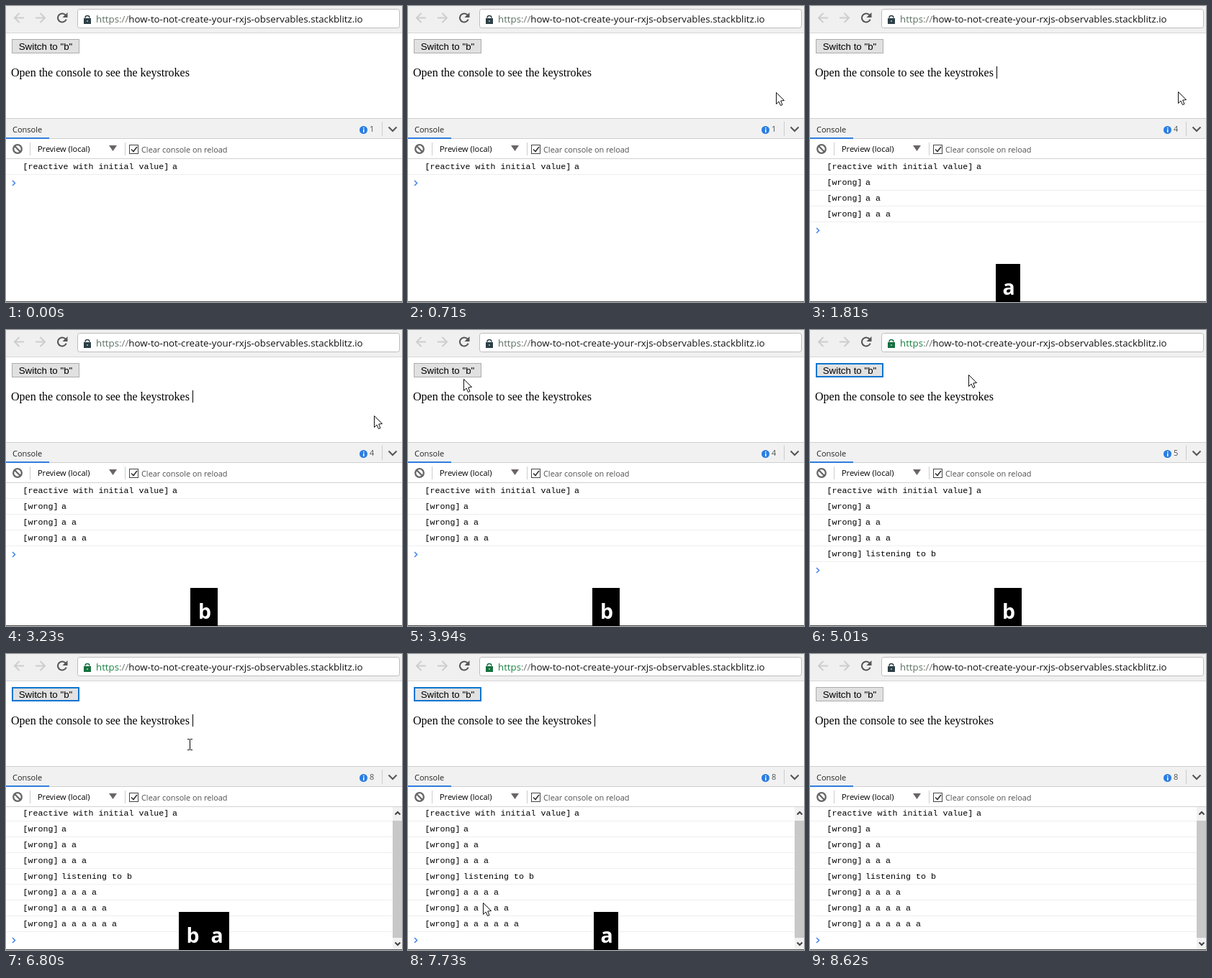
Write an HTML page with a canvas that moves like this. It is 550 px wide and 412 px high and loops after 8640 ms.

```html
<!DOCTYPE html>
<html lang="en">
<head>
<meta charset="utf-8">
<title>Console keystrokes</title>
<style>
  html, body { margin: 0; width: 100%; height: 100%; overflow: hidden; background: #fff; }
  canvas { display: block; width: 550px; height: 412px; }
</style>
</head>
<body>
<canvas id="stage" width="550" height="412"></canvas>
<script>
const ctx = document.getElementById('stage').getContext('2d');
const W = 550, H = 412, LOOP = 8640;
const SANS = '"Open Sans", "Noto Sans", sans-serif';
const MONO = '11.667px "Liberation Mono", "Courier New", monospace';
const UI = '11px ' + SANS;

const LOGS = [
  [0, '[reactive with initial value]', 'a'],
  [1070, '[wrong]', 'a'],
  [1450, '[wrong]', 'a a'],
  [1760, '[wrong]', 'a a a'],
  [4180, '[wrong]', 'listening to b'],
  [6300, '[wrong]', 'a a a a'],
  [6600, '[wrong]', 'a a a a a'],
  [6780, '[wrong]', 'a a a a a a']
];
// Times at which the caret toggles, starting hidden.
const CARET = [760, 1290, 1800, 2300, 2820, 3340, 4310, 4830, 5370, 5890, 6400, 7170, 7690, 8210];
const KEYS = [[0, ''], [1070, 'a'], [2530, 'ab'], [2590, 'b'], [6300, 'ba'], [6900, 'a'], [8030, '']];

const linear = u => u;
const smooth = u => u * u * (3 - 2 * u);
const easeOut = u => 1 - (1 - u) * (1 - u);
const easeIn = u => u * u;
// Pointer stops: time, x, y, easing of the way there.
const PATH = [
  [100, 470, 371, linear],
  [760, 511, 119, easeOut],
  [3230, 511, 119, linear],
  [3940, 77, 68, smooth],
  [4080, 78, 65, smooth],
  [4180, 78, 65, linear],
  [4830, 220, 62, smooth],
  [6770, 220, 62, linear],
  [6800, 255, 126, linear],
  [7730, 104, 346, easeOut],
  [8060, 62, 413, easeIn]
];

function rect(x, y, w, h, color) {
  ctx.fillStyle = color;
  ctx.fillRect(x, y, w, h);
}

function text(str, x, y, font, color, align = 'left') {
  ctx.font = font;
  ctx.fillStyle = color;
  ctx.textAlign = align;
  ctx.fillText(str, x, y);
}

function trace(points) {
  ctx.beginPath();
  points.forEach(([x, y], i) => i ? ctx.lineTo(x, y) : ctx.moveTo(x, y));
}

function line(points, color, width = 1) {
  trace(points);
  ctx.strokeStyle = color;
  ctx.lineWidth = width;
  ctx.stroke();
}

function shape(points, color) {
  trace(points);
  ctx.closePath();
  ctx.fillStyle = color;
  ctx.fill();
}

function arc(x, y, r, from, to, color, width) {
  ctx.beginPath();
  ctx.arc(x, y, r, from, to);
  ctx.strokeStyle = color;
  ctx.lineWidth = width;
  ctx.stroke();
}

function navArrow(tip, dir) {
  line([[tip, 16.5], [tip + dir * 13, 16.5]], '#cdcdcd', 2);
  line([[tip + dir * 6.5, 10], [tip, 16.5], [tip + dir * 6.5, 23]], '#cdcdcd', 2);
}

function addressBar(secure) {
  rect(0, 0, W, 37, '#f0f0f0');
  rect(0, 37, W, 1, '#d6d6d6');
  navArrow(12, 1);
  navArrow(54, -1);
  arc(78, 16.5, 6, 0.35, Math.PI * 1.78, '#555', 2);
  shape([[85.5, 9], [85.5, 16], [78.5, 16]], '#555');

  ctx.beginPath();
  ctx.roundRect(99.5, 4.5, 447, 26, 3);
  ctx.fillStyle = '#fff';
  ctx.fill();
  ctx.strokeStyle = '#bdbdbd';
  ctx.lineWidth = 1;
  ctx.stroke();

  const lock = secure ? '#17703f' : '#2c3f46';
  rect(108, 17, 10, 8, lock);
  arc(113, 16.5, 3, Math.PI, 0, lock, 1.6);
  rect(112.5, 20, 1, 2, '#fff');

  const font = '13.3px ' + SANS;
  let x = 125;
  const parts = [
    ['https', secure ? '#17803f' : '#5a6f60'],
    ['://', '#757575'],
    ['how-to-not-create-your-rxjs-observables.stackblitz.io', '#111']
  ];
  for (const [str, color] of parts) {
    text(str, x, 23, font, color);
    x += ctx.measureText(str).width;
  }
}

function page(focused, caret) {
  rect(8, 46, 94, 20, focused ? '#0a75d0' : '#adadad');
  const b = focused ? 2 : 1;
  rect(8 + b, 46 + b, 94 - 2 * b, 20 - 2 * b, '#e1e1e1');
  text('Switch to "b"', 55, 61, '13.333px "Liberation Sans", Arial, sans-serif', '#000', 'center');
  text('Open the console to see the keystrokes', 7, 98, '16px "Liberation Serif", Times, serif', '#000');
  if (caret) rect(259, 84, 1, 17, '#000');
}

function logRows(rows, scrolled) {
  const shift = scrolled ? -2 : 0;
  const right = scrolled ? 537 : W;
  rows.forEach(([, label, value], i) => {
    const y = 213 + 22 * i + shift;
    text(label, 23.5, y + 14, MONO, '#000');
    text(value, 28 + 7 * label.length, y + 14, MONO, '#000');
    rect(0, y + 21, right, 1, '#efefef');
  });
  const y = 246.5 + 22 * (rows.length - 1) + shift;
  line([[9, y - 3.5], [12.5, y], [9, y + 3.5]], '#4285e8', 1.5);

  if (scrolled) {
    rect(537, 213, 13, 199, '#f1f1f1');
    rect(537, 232, 13, 163, '#c8c8c8');
    line([[540.5, 223.5], [544, 220], [547.5, 223.5]], '#404048', 2);
    line([[540.5, 401.5], [544, 405], [547.5, 401.5]], '#404048', 2);
  }
}

function consoleBars(count) {
  rect(0, 156, W, 29, '#f1f1f1');
  rect(0, 156, W, 1, '#cfcfcf');
  rect(0, 184, W, 1, '#cfcfcf');
  rect(0, 183, 60, 2, '#2f7de0');
  text('Console', 9, 176, UI, '#222');

  ctx.beginPath();
  ctx.arc(496.5, 172.5, 5.5, 0, 7);
  ctx.fillStyle = '#2b7de1';
  ctx.fill();
  rect(496, 169, 1.5, 1.5, '#fff');
  rect(496, 171.5, 1.5, 4.5, '#fff');
  text(count, 505, 175, UI, '#505050');
  rect(522, 161, 1, 20, '#cccccc');
  line([[531.5, 168.5], [537, 174], [542.5, 168.5]], '#555', 2);

  rect(0, 185, W, 28, '#fff');
  rect(0, 212, W, 1, '#d2d2d2');
  arc(16, 199, 5.8, 0, 7, '#666', 2.3);
  line([[12, 195], [20, 203]], '#666', 2.3);
  rect(33, 190, 1, 18, '#cccccc');
  text('Preview (local)', 44, 203, UI, '#000');
  shape([[143, 194], [154, 194], [148.5, 202]], '#6a6464');
  rect(165, 190, 1, 18, '#cccccc');
  ctx.strokeStyle = '#444';
  ctx.lineWidth = 1;
  ctx.strokeRect(171.5, 193.5, 12, 12);
  line([[174, 199.5], [177, 202.5], [182, 196]], '#333', 1.6);
  text('Clear console on reload', 188, 204, '10.9px ' + SANS, '#505050');
}

function keyOverlay(keys) {
  if (!keys) return;
  const width = keys.length > 1 ? 70 : keys === 'a' ? 34 : 38;
  rect(275 - width / 2, 359, width, 53, '#000');
  const spots = keys.length > 1 ? [259.5, 293] : [276];
  spots.forEach((x, i) => text(keys[i], x, 402, 'bold 28.5px ' + SANS, '#fff', 'center'));
}

function pointerAt(t) {
  const i = PATH.findIndex(p => p[0] > t);
  if (i < 1) return null;
  const [t0, x0, y0] = PATH[i - 1];
  const [t1, x1, y1, ease] = PATH[i];
  const u = ease((t - t0) / (t1 - t0));
  return [Math.round(x0 + (x1 - x0) * u), Math.round(y0 + (y1 - y0) * u)];
}

function pointer(t) {
  const pos = pointerAt(t);
  if (!pos) return;
  const [x, y] = pos;
  if (x < 260 && y > 84 && y < 130) {
    rect(x, y - 7, 1, 14, '#000');
    for (const dy of [-8, 7]) {
      rect(x - 3, y + dy, 3, 1, '#000');
      rect(x + 1, y + dy, 3, 1, '#000');
    }
    return;
  }
  const arrow = [[0.5, 0.5], [0.5, 16.5], [4, 13], [6.5, 18.5], [9, 17.5], [6.7, 12], [11.5, 11.5]]
    .map(([dx, dy]) => [x + dx, y + dy]);
  shape(arrow, '#fff');
  line([...arrow, arrow[0]], '#111', 1);
}

function draw(t) {
  const rows = LOGS.filter(([at]) => at <= t);
  const scrolled = rows.length === LOGS.length;
  const caret = CARET.filter(at => at <= t).length % 2 === 1;
  const keys = KEYS.filter(([at]) => at <= t).pop()[1];

  rect(0, 0, W, H, '#fff');
  addressBar(t >= 4180 && t < 8060);
  page(t >= 4180 && t < 8620, caret);
  logRows(rows, scrolled);
  consoleBars(rows.length);
  rect(0, 411, W, 1, '#4c4c4c');
  keyOverlay(keys);
  pointer(t);
}

const start = performance.now();
function tick() {
  draw((performance.now() - start) % LOOP);
  requestAnimationFrame(tick);
}
tick();
</script>
</body>
</html>
```
